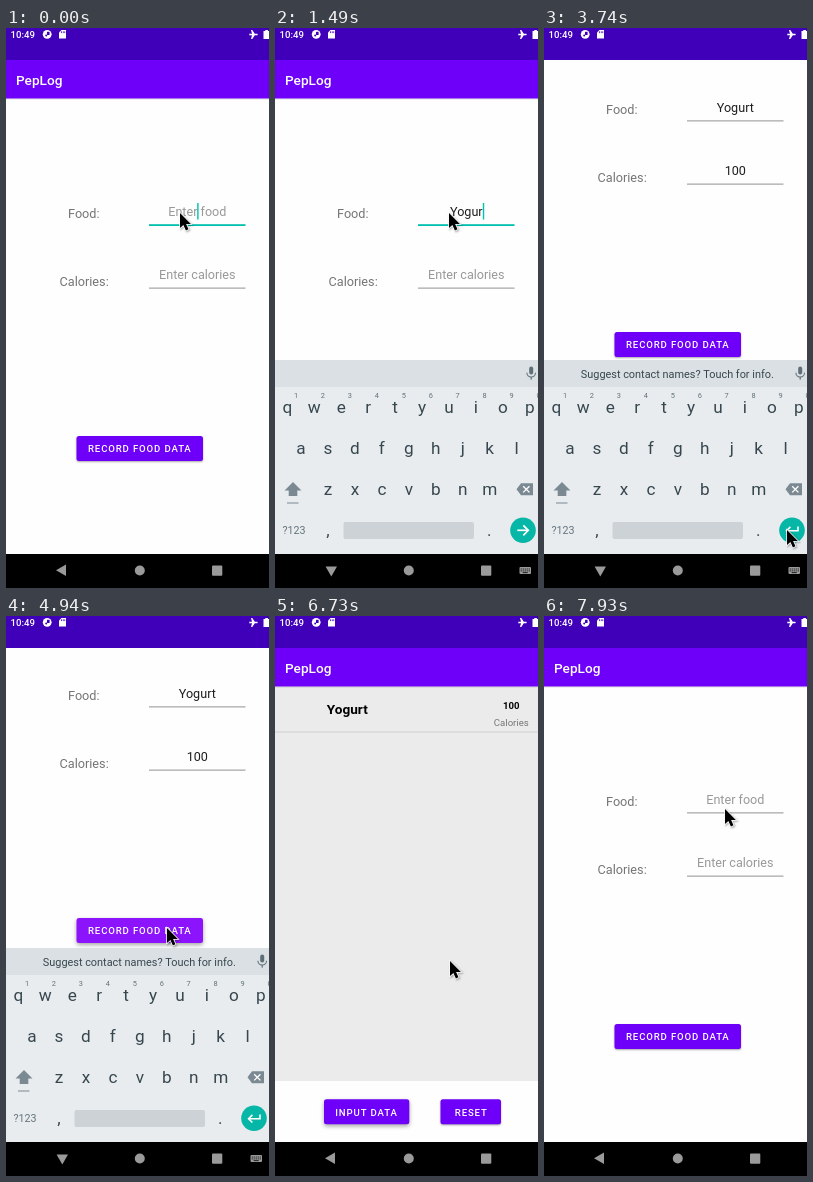
Recreate the animation shown at these times as an HTML page with a canvas. Size 263 by 560 pixels, loop 8000 ms.

```html
<!DOCTYPE html>
<html lang="en">
<head>
<meta charset="utf-8">
<title>Food log</title>
<style>
html, body { margin: 0; width: 100%; height: 100%; overflow: hidden; background: #000; }
canvas { display: block; width: 263px; height: 560px; }
</style>
</head>
<body>
<canvas id="stage"></canvas>
<script>
const W = 263, H = 560, LOOP = 8000, STEP = 150;
const PURPLE = '#6e00f9', DARK = '#4000b9', PRESSED = '#8c14fc', TEAL = '#00c0b0';
const GREY = '#757575', INK = '#37474f';
const canvas = document.getElementById('stage');
const ctx = canvas.getContext('2d');
const dpr = window.devicePixelRatio || 1;
canvas.width = W * dpr;
canvas.height = H * dpr;

const bursts = [[0, 1], [140, 3], [740, 7], [1790, 6], [2840, 7], [3890, 7],
  [4940, 7], [5990, 1], [6430, 7], [7930, 1]];
const ticks = bursts.flatMap(([start, n]) => Array.from({ length: n }, (_, i) => start + i * STEP));

// Pointer keys: time, x, y
const pointerPath = [
  [0, 174, 185], [1640, 174, 185], [1790, 179, 203], [1940, 190, 236], [2090, 193, 243],
  [2690, 193, 243], [2990, 217, 365], [3290, 243, 500], [3740, 243, 502], [3890, 243, 505],
  [4040, 239, 490], [4340, 195, 385], [4640, 164, 319], [4790, 161, 312], [5090, 161, 312],
  [5390, 157, 458], [5540, 132, 488], [5690, 112, 497], [5840, 105, 499], [5990, 102, 499],
  [6430, 102, 499], [6580, 136, 428], [6730, 175, 345], [6880, 176, 297], [7030, 170, 248],
  [7180, 164, 219], [7330, 161, 208], [7780, 161, 208], [7930, 181, 193]
];
const panPath = [[3440, 0], [3590, 62], [3740, 104], [3890, 106]];
const keyboardPath = [[140, 110], [290, 12], [440, 0], [5090, 0], [5240, 90]];
const backPath = [[140, 0], [290, -70], [440, -90], [5090, -90], [5240, -80], [5390, -48], [5540, 0]];

function along(path, t) {
  if (t <= path[0][0]) return path[0].slice(1);
  for (let i = 1; i < path.length; i++) {
    const a = path[i - 1], b = path[i];
    if (t <= b[0]) {
      const k = (t - a[0]) / (b[0] - a[0]);
      return a.slice(1).map((v, j) => v + (b[j + 1] - v) * k);
    }
  }
  return path[path.length - 1].slice(1);
}

function rect(x, y, w, h, color) {
  ctx.fillStyle = color;
  ctx.fillRect(x, y, w, h);
}

function round(x, y, w, h, r, color) {
  ctx.fillStyle = color;
  ctx.beginPath();
  ctx.roundRect(x, y, w, h, r);
  ctx.fill();
}

function disc(x, y, r, color) {
  ctx.fillStyle = color;
  ctx.beginPath();
  ctx.arc(x, y, r, 0, Math.PI * 2);
  ctx.fill();
}

function trace(points, close) {
  ctx.beginPath();
  points.forEach(([x, y]) => ctx.lineTo(x, y));
  if (close) ctx.closePath();
}

function poly(points, color) {
  trace(points, true);
  ctx.fillStyle = color;
  ctx.fill();
}

function line(points, color, width) {
  trace(points);
  ctx.strokeStyle = color;
  ctx.lineWidth = width;
  ctx.stroke();
}

function text(str, x, y, size, color, { weight = 400, align = 'left', spacing = 0 } = {}) {
  ctx.font = `${weight} ${size}px Roboto, sans-serif`;
  ctx.letterSpacing = spacing + 'px';
  ctx.textAlign = align;
  ctx.fillStyle = color;
  ctx.fillText(str, x, y);
  return ctx.measureText(str).width;
}

function button(label, x, y, w, textX, { color = PURPLE, lift = 1 } = {}) {
  ctx.save();
  ctx.shadowColor = 'rgba(0,0,0,.35)';
  ctx.shadowBlur = 2 * lift * dpr;
  ctx.shadowOffsetY = lift * dpr;
  round(x, y, w, 25, 2.5, color);
  ctx.restore();
  text(label, textX, y + 16.3, 9.6, '#fff', { weight: 500, spacing: 0.86 });
}

function header() {
  rect(0, 32, W, 38.5, PURPLE);
  rect(0, 70.5, W, 1, 'rgba(0,0,0,.12)');
  text('PepLog', 10, 57, 13.6, '#fff', { weight: 500 });
}

function field(value, hint, y, focused, caret) {
  const w = text(value || hint, 191.3, y, 12.6, value ? '#1e1e1e' : '#999', { align: 'center' });
  if (focused) rect(143, y + 8.2, 96.5, 1.8, TEAL);
  else rect(143, y + 8.4, 96.5, 1, '#929292');
  if (focused && caret) rect(value ? 191.5 + w / 2 : 191.2, y - 13, 1.4, 16.5, TEAL);
}

function formState(t) {
  const s = { food: '', calories: '', focus: '', caret: true, pressed: t >= 4940 && t < 5390 };
  if (t < 6000) {
    s.food = 'Yogurt'.slice(0, Math.max(0, Math.floor((t - 740) / STEP)));
    s.calories = '100'.slice(0, Math.max(0, Math.floor((t - 2090) / STEP)));
    s.focus = t < 2090 ? 'food' : t < 3590 ? 'calories' : '';
    s.caret = !(t >= 290 && t < 740) && !(t >= 2990 && t < 3440);
  }
  return s;
}

function formScreen(t) {
  const s = formState(t);
  ctx.save();
  ctx.beginPath();
  ctx.rect(0, 0, W, 526);
  ctx.clip();
  rect(0, 0, W, 526, '#fefefe');
  ctx.save();
  ctx.translate(0, t < 6000 ? -along(panPath, t)[0] : 0);
  header();
  text('Food:', 62, 190.3, 12.7, GREY);
  text('Calories:', 53.5, 257.8, 12.7, GREY);
  field(s.food, 'Enter food', 188, s.focus === 'food', s.caret);
  field(s.calories, 'Enter calories', 251.2, s.focus === 'calories', s.caret);
  button('RECORD FOOD DATA', 70.5, 408, 126.5, 82,
    s.pressed ? { color: PRESSED, lift: 2 } : {});
  ctx.restore();
  rect(0, 0, W, 32, DARK);
  ctx.restore();
}

function listScreen(t) {
  rect(0, 0, W, 526, '#fefefe');
  rect(0, 70.5, W, 394.5, '#ebebeb');
  rect(0, 0, W, 32, DARK);
  header();
  text('Yogurt', 51.8, 98.3, 13.6, '#000', { weight: 700 });
  text('100', 236.3, 92.7, 9.6, '#000', { weight: 700, align: 'center' });
  text('Calories', 236.3, 110.3, 9.6, GREY, { align: 'center' });
  rect(0, 115.5, W, 1, '#cfcfcf');
  const hot = t >= 6430;
  button('INPUT DATA', 49, 483.3, 85.3, 60.3,
    { lift: hot ? 2 : 1, color: hot && t < 6580 ? PRESSED : PURPLE });
  button('RESET', 165.5, 483.3, 60.5, 179.8);
}

function zoomed(scale, alpha, draw) {
  ctx.save();
  ctx.globalAlpha = alpha;
  ctx.translate(W / 2, H / 2);
  ctx.scale(scale, scale);
  ctx.translate(-W / 2, -H / 2);
  draw();
  ctx.restore();
}

function screens(t) {
  if (t < 5390) formScreen(t);
  else if (t < 6880) zoomed(t < 5540 ? 1.004 : 1, 1, () => listScreen(t));
  else {
    if (t < 7180) zoomed(t < 7030 ? 1.02 : 1.03, 1, () => listScreen(t));
    const scale = t < 7030 ? 0.93 : t < 7180 ? 0.99 : t < 7330 ? 0.998 : 1;
    zoomed(scale, t < 7030 ? 0.5 : 1, () => formScreen(t));
  }
}

function statusIcons() {
  text('10:49', 4.5, 10, 9.6, '#fff', { weight: 500 });
  disc(41.2, 6.3, 4.4, '#fff');
  rect(41, 3.8, 2.6, 3.2, DARK);
  disc(40.2, 7.4, 1, DARK);
  poly([[55.5, 2], [60, 2], [60, 10.5], [53, 10.5], [53, 4.5]], '#fff');
  for (const x of [55.2, 56.8, 58.4]) rect(x, 3.3, 0.8, 1.8, DARK);
  // Airplane
  poly([[243, 5.7], [246, 5.7], [245, 2], [246.3, 2], [248.8, 5.7], [251.3, 5.7], [251.8, 6.5],
    [251.3, 7.3], [248.8, 7.3], [246.3, 11], [245, 11], [246, 7.3], [243, 7.3], [243.5, 6.5]], '#fff');
  rect(257.5, 3, 5.5, 8, '#fff');
  rect(259.3, 2, 2.6, 1, '#fff');
}

function navIcons(t, keyboardUp) {
  const c = '#9a9a9a';
  ctx.save();
  ctx.translate(56.3, 542.3);
  ctx.rotate(along(backPath, t)[0] * Math.PI / 180);
  poly([[-6.3, 0], [3.7, -5.7], [3.7, 5.7]], c);
  ctx.restore();
  disc(133.8, 542.5, 5, c);
  round(206, 537.5, 10.3, 10.3, 1, c);
  if (keyboardUp) {
    round(244.5, 539, 11.5, 7, 1, c);
    for (let i = 0; i < 5; i++) {
      rect(245.7 + i * 2, 540.5, 1, 1, '#000');
      rect(245.7 + i * 2, 542.4, 1, 1, '#000');
    }
    rect(247.7, 544.3, 5, 0.8, '#000');
  }
}

function keyRow(letters, x, y) {
  [...letters].forEach((ch, i) => text(ch, x + i * 26.95, y, 17.2, INK, { align: 'center' }));
}

function enterKey(t) {
  disc(248, 502.3, 12.8, '#06b6a6');
  if (t >= 2090 && t < 3590) {
    line([[242, 502.5], [246, 506.5], [254.3, 498]], '#fff', 1.8);
  } else if (t < 2090) {
    line([[242.3, 502.3], [253, 502.3]], '#fff', 1.7);
    line([[248.3, 497.3], [253.3, 502.3], [248.3, 507.3]], '#fff', 1.7);
  } else {
    line([[254, 498.5], [254, 502.7], [242.8, 502.7]], '#fff', 1.6);
    line([[246.4, 498.9], [242.6, 502.7], [246.4, 506.5]], '#fff', 1.6);
  }
}

function keyboard(t) {
  const soft = '#7b8a92';
  rect(0, 332, W, 194, '#e8ecef');
  rect(0, 332, W, 27, '#dae0e3');
  rect(0, 526, W, 34, '#000');
  if (t < 890 || t >= 2090) text('Suggest contact names? Touch for info.', 36.8, 350, 10.9, INK);
  // Microphone
  round(254.2, 338.5, 4, 8, 2, '#5f6f78');
  ctx.strokeStyle = '#5f6f78';
  ctx.lineWidth = 1.1;
  ctx.beginPath();
  ctx.arc(256.2, 344.7, 4.3, 0, Math.PI);
  ctx.stroke();
  rect(255.6, 349, 1.2, 2.6, '#5f6f78');

  keyRow('qwertyuiop', 12.3, 385.3);
  [...'1234567890'].forEach((d, i) => text(d, 21 + i * 26.95, 370, 7.4, '#62717a', { align: 'center' }));
  keyRow('asdfghjkl', 26, 426.3);
  keyRow('zxcvbnm', 53, 467.3);
  // Shift
  poly([[18, 454], [26.5, 462.5], [22.3, 462.5], [22.3, 468], [13.7, 468], [13.7, 462.5], [9.5, 462.5]], soft);
  rect(12, 474.5, 11.5, 1, soft);
  // Backspace
  poly([[241.5, 461.3], [246, 455.3], [258, 455.3], [258, 467.3], [246, 467.3]], soft);
  line([[248.2, 458.2], [254.4, 464.4]], '#fff', 1.3);
  line([[254.4, 458.2], [248.2, 464.4]], '#fff', 1.3);

  text('?123', 19, 506.3, 10.7, '#64747d', { align: 'center' });
  text(',', 53, 507.5, 17.2, INK, { align: 'center' });
  round(68.5, 494, 130.5, 17, 2, '#ccd2d5');
  text('.', 214.3, 507.5, 17.2, INK, { align: 'center' });
  enterKey(t);
}

function pointer(x, y) {
  ctx.save();
  ctx.translate(x, y);
  trace([[0, 0], [0, 15], [3.4, 11.9], [5.9, 17.4], [8.5, 16.2], [6.1, 10.9], [10.9, 10.9]], true);
  ctx.shadowColor = 'rgba(0,0,0,.35)';
  ctx.shadowBlur = 2 * dpr;
  ctx.shadowOffsetX = ctx.shadowOffsetY = dpr;
  ctx.strokeStyle = '#fff';
  ctx.lineWidth = 1.5;
  ctx.stroke();
  ctx.shadowColor = 'transparent';
  ctx.fillStyle = '#000';
  ctx.fill();
  ctx.restore();
}

function draw(time) {
  const t = ticks.filter(k => k <= time).pop();
  const keyboardUp = t >= 140 && t < 5390;
  ctx.setTransform(dpr, 0, 0, dpr, 0, 0);
  rect(0, 0, W, H, '#000');
  screens(t);
  if (keyboardUp) {
    ctx.save();
    ctx.translate(0, along(keyboardPath, t)[0]);
    keyboard(t);
    ctx.restore();
  }
  statusIcons();
  navIcons(t, keyboardUp);
  pointer(...along(pointerPath, t));
}

const start = performance.now();
function loop() {
  draw((performance.now() - start) % LOOP);
  requestAnimationFrame(loop);
}
loop();
</script>
</body>
</html>
```
